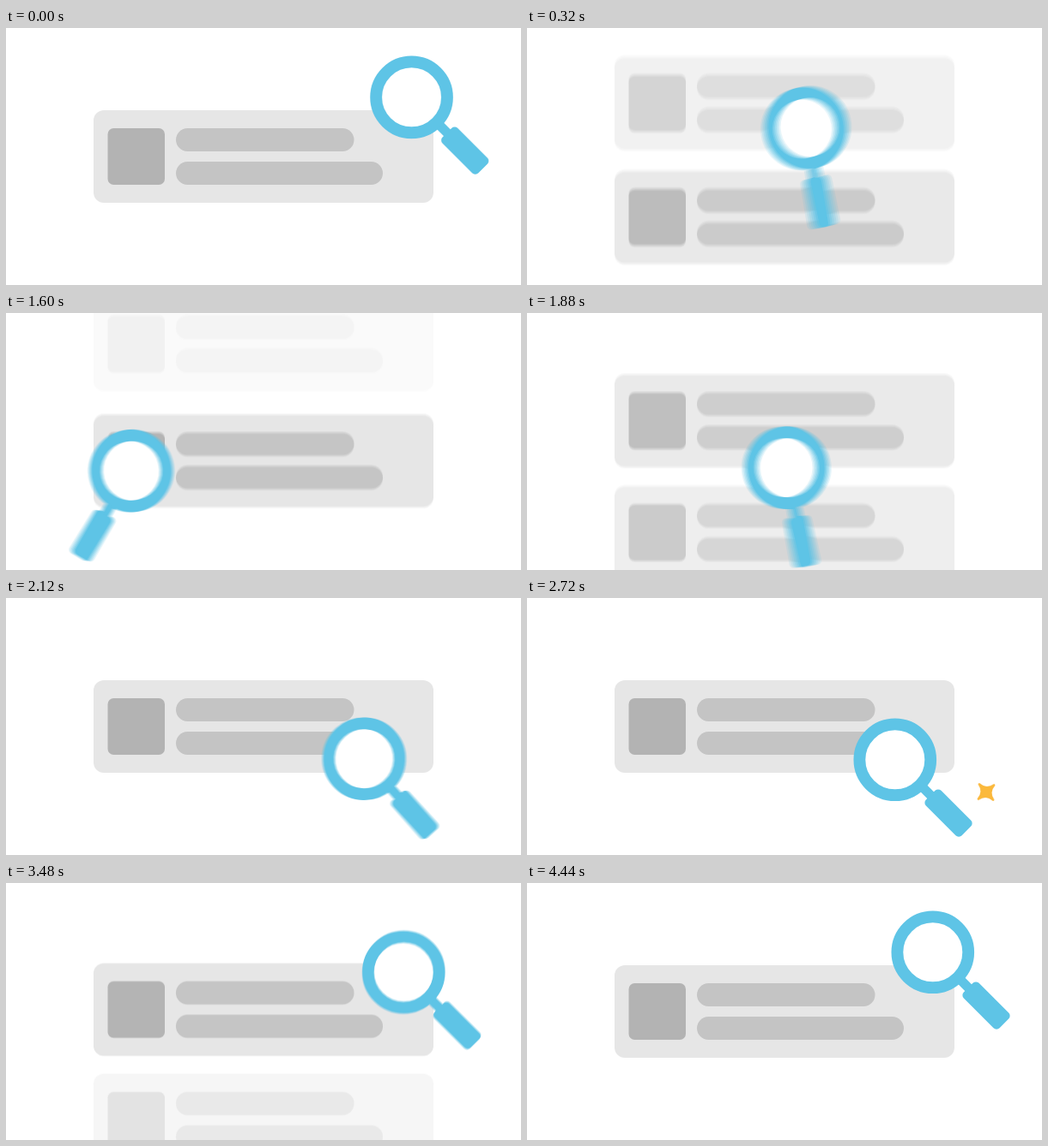
Write an HTML page with a canvas that moves like this. It is 600x300 px and loops after 4.52 s.

```html
<!DOCTYPE html>
<html lang="en">
<head>
<meta charset="utf-8">
<title>Search results</title>
<style>
  html, body { margin: 0; width: 100%; height: 100%; overflow: hidden; background: #fff; }
  canvas { display: block; width: 600px; height: 300px; }
</style>
</head>
<body>
<canvas id="stage" width="600" height="300"></canvas>
<script>
const LOOP = 4520, STEP = 40;
const BLUE = '#5ec4e6', GOLD = '#fbb93c';
const SHUTTER = 14, SAMPLES = 7;

// Pivot and handle angle of the magnifier at each stop.
const STOPS = [
  { x: 494, y: 102, a: 45 },
  { x: 96, y: 210, a: -39 },
  { x: 450, y: 210, a: 45 }
];
const LENS_STARTS = [-10, 1455, 2955], LENS_TIME = 750;
const CARD_STARTS = [0, 1440, 2925], CARD_TIME = 600, FADE_TIME = 640;
const SPARKS = [
  { x: 43, y: 206, in: [800, 1000], out: [1180, 1440] },
  { x: 535, y: 226.5, in: [2290, 2520], out: [2700, 2950] },
  { x: 377.5, y: 58, in: [3800, 4000], out: [4185, 4440] }
];

const view = document.getElementById('stage').getContext('2d');
const layer = document.createElement('canvas');
layer.width = 600;
layer.height = 300;
const g = layer.getContext('2d');

const clamp = v => Math.min(1, Math.max(0, v));
const smooth = u => u * u * (3 - 2 * u);
const mix = (a, b, p) => a + (b - a) * p;
const span = (t, [from, to]) => smooth(clamp((t - from) / (to - from)));

function current(starts, t) {
  let k = 0;
  starts.forEach((s, i) => { if (t >= s) k = i; });
  return { k, dt: Math.max(0, t - starts[k]) };
}

function box(x, y, w, h, r, fill) {
  g.fillStyle = fill;
  g.beginPath();
  g.roundRect(x, y, w, h, r);
  g.fill();
}

function card(dy, alpha) {
  if (alpha <= 0) return;
  const gray = v => {
    const c = Math.round(mix(255, v, alpha));
    return `rgb(${c},${c},${c})`;
  };
  box(102, 96 + dy, 396, 108, 12, gray(230));
  box(118.5, 117 + dy, 66.5, 66, 7, gray(179));
  box(198, 117 + dy, 207.5, 27, 13.5, gray(196));
  box(198, 156 + dy, 241, 27, 13.5, gray(196));
}

function cards(t) {
  const { dt } = current(CARD_STARTS, t);
  const p = smooth(clamp(dt / CARD_TIME));
  card(129 * p, 1 - clamp(dt / FADE_TIME) ** 3);
  card(-138 * (1 - p), p);
}

function lens(t) {
  const { k, dt } = current(LENS_STARTS, t);
  const from = STOPS[k], to = STOPS[(k + 1) % 3];
  const p = smooth(clamp(dt / LENS_TIME));
  g.save();
  g.translate(mix(from.x, to.x, p), mix(from.y, to.y, p));
  g.rotate(-mix(from.a, to.a, p) * Math.PI / 180);
  g.translate(0, -30);
  box(-5.5, 44, 11, 20, 0, BLUE);
  box(-12.5, 58.5, 25, 59, 5, BLUE);
  g.beginPath();
  g.arc(0, 0, 41.4, 0, 7);
  g.fillStyle = '#fff';
  g.fill();
  g.lineWidth = 13.8;
  g.strokeStyle = BLUE;
  g.stroke();
  g.restore();
}

function spark(s, t) {
  const grow = span(t, s.in), shrink = span(t, s.out);
  const size = grow * (1 - shrink);
  if (size < 0.01) return;
  g.save();
  g.translate(s.x, s.y);
  g.rotate(Math.PI * (grow + shrink + 0.25));
  g.scale(size, size);
  g.beginPath();
  g.moveTo(12.5, 0);
  for (let i = 0; i < 4; i++) {
    const a = i * Math.PI / 2, mid = a + Math.PI / 4, end = a + Math.PI / 2;
    g.quadraticCurveTo(2 * Math.cos(mid), 2 * Math.sin(mid),
      12.5 * Math.cos(end), 12.5 * Math.sin(end));
  }
  g.closePath();
  g.fillStyle = g.strokeStyle = GOLD;
  g.lineWidth = 2.5;
  g.lineJoin = 'round';
  g.fill();
  g.stroke();
  g.restore();
}

function scene(t) {
  g.fillStyle = '#fff';
  g.fillRect(0, 0, 600, 300);
  cards(t);
  lens(t);
  SPARKS.forEach(s => spark(s, t));
}

// Running average over the shutter gives the motion blur.
function render(t) {
  for (let i = 0; i < SAMPLES; i++) {
    scene(t + SHUTTER * (i / (SAMPLES - 1) - 0.5));
    view.globalAlpha = 1 / (i + 1);
    view.drawImage(layer, 0, 0);
  }
}

const begin = performance.now();
let shown = -1;

function tick() {
  const t = Math.floor((performance.now() - begin) % LOOP / STEP) * STEP;
  if (t !== shown) render(shown = t);
  requestAnimationFrame(tick);
}
tick();
</script>
</body>
</html>
```
